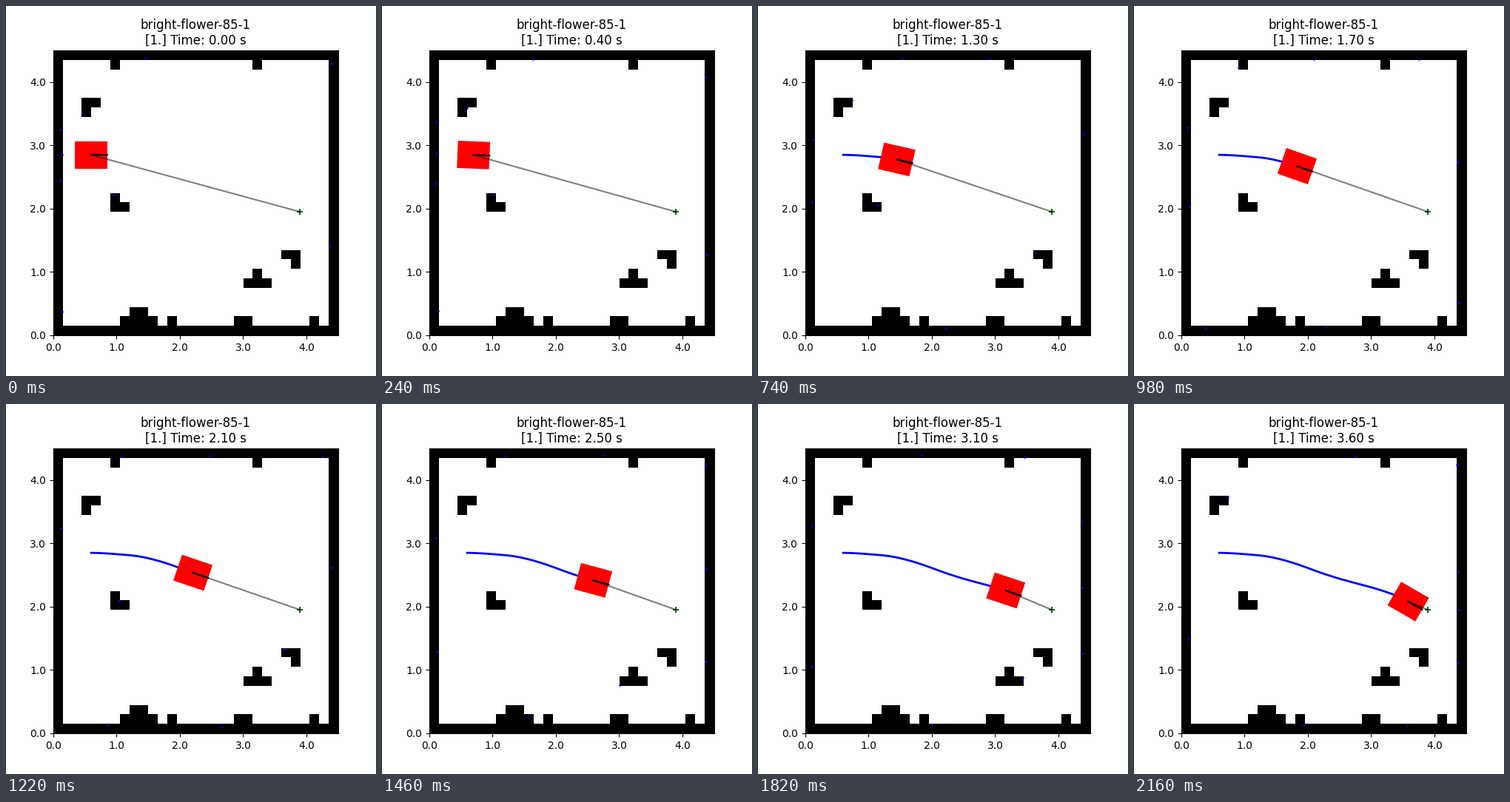
Recreate the animation shown at these times as a matplotlib script. Size 500x500 px, loop 2260 ms.

```python
import numpy as np
import matplotlib.pyplot as plt
from matplotlib.animation import FuncAnimation
from matplotlib.patches import Polygon

SIZE, CELL, N = 4.5, 0.15, 30
LENGTH, WIDTH = 0.508, 0.43
START, GOAL = (0.6, 2.85), (3.9, 1.95)
STEPS, DT = 37, 0.1
TICK_MS, TICKS = 20, 113

# Steering: heading in degrees at a few times
TURN_T = [0, 0.8, 1.0, 1.3, 1.7, 1.9, 2.5, 2.8, 3.1, 3.6]
TURN = [0, -4.6, -5, -13, -19.4, -20.5, -15.1, -14.8, -18.4, -30]

# Beam directions relative to the heading
SIDE = 180 - 39.8 * np.arange(1, 5)
BEAMS = np.radians(np.concatenate([[180], SIDE, -SIDE]))
RANGES = np.arange(0, 6.5, 0.005)


def make_grid():
    """Occupied cells, row 0 at the top."""
    grid = np.ones((N, N))
    grid[1:-1, 1:-1] = 0
    grid[1, [6, 21]] = 1                        # studs on the top wall
    grid[28, [12, 19, 20, 27]] = 1              # studs on the bottom wall
    grid[27, 8:10] = grid[28, 7:11] = 1         # stepped mound
    grid[23, 21] = grid[24, 20:23] = 1          # T piece
    for row, col, gap in [(5, 3, (1, 1)), (15, 6, (0, 1)), (21, 24, (1, 0))]:
        grid[row:row + 2, col:col + 2] = 1      # corner pieces
        grid[row + gap[0], col + gap[1]] = 0
    return grid


def drive():
    """Speed up, cruise, brake near the goal; Euler steps along the heading."""
    t = np.arange(STEPS) * DT
    heading = np.radians(np.interp(t, TURN_T, TURN))
    speed = np.minimum(np.minimum(t, 1), 4.35 - t)[1:, None]
    dirs = np.column_stack([np.cos(heading), np.sin(heading)])
    moves = speed * DT * dirs[:-1]
    return np.vstack([START, START + np.cumsum(moves, axis=0)]), heading


def scan(pos, heading, depth):
    """Points where the beams enter a wall, pushed in by a small depth."""
    ang = heading + BEAMS
    dirs = np.column_stack([np.cos(ang), np.sin(ang)])
    pts = pos + RANGES[None, :, None] * dirs[:, None, :]
    col = np.clip((pts[..., 0] / CELL).astype(int), 0, N - 1)
    row = np.clip(((SIZE - pts[..., 1]) / CELL).astype(int), 0, N - 1)
    hit = RANGES[np.argmax(grid[row, col] > 0, axis=1)]
    return pos + (hit + depth)[:, None] * dirs


def step_at(tick):
    """Odd steps stay five ticks, even steps one."""
    pair, rest = divmod(tick - 1, 6)
    return min(2 * pair + 1 + (rest == 5), STEPS - 1)


grid = make_grid()
track, headings = drive()
depths = np.random.default_rng(85).uniform(0.01, 0.05, (STEPS, len(BEAMS)))
scans = [scan(*args) for args in zip(track, headings, depths)]
corners = np.array([(1, 1), (-1, 1), (-1, -1), (1, -1)]) * (LENGTH / 2, WIDTH / 2)

fig, ax = plt.subplots(figsize=(5, 5), dpi=100)
ax.imshow(grid[::-1], cmap="gray_r", origin="lower", extent=(0, SIZE, 0, SIZE))
ax.set_xticks(range(5))
ax.set_yticks(range(5))
ax.xaxis.set_major_formatter("{x:.1f}")
ax.yaxis.set_major_formatter("{x:.1f}")
title = ax.set_title("")

trail, = ax.plot([], [], "b", lw=2, zorder=2)
hits = ax.scatter([], [], s=1, c="b", zorder=2)
body = ax.add_patch(Polygon(corners, fc="red", ec="none", zorder=3))
ax.scatter(*GOAL, marker="+", s=36, c="darkgreen", zorder=4)
aim, = ax.plot([], [], "k", alpha=0.5, zorder=4)
nose, = ax.plot([], [], "k", zorder=5)
ax.set_xlim(0, SIZE)
ax.set_ylim(0, SIZE)


def update(tick):
    k = step_at(tick)
    (x, y), ang = track[k], headings[k]
    c, s = np.cos(ang), np.sin(ang)
    body.set_xy(corners @ np.array([(c, s), (-s, c)]) + (x, y))
    trail.set_data(*track[:k + 1].T)
    aim.set_data([x, GOAL[0]], [y, GOAL[1]])
    nose.set_data([x, x + LENGTH / 2 * c], [y, y + LENGTH / 2 * s])
    hits.set_offsets(scans[k])
    title.set_text(f"bright-flower-85-1\n[1.] Time: {k * DT:.2f} s")
    return trail, body, aim, nose, hits, title


anim = FuncAnimation(fig, update, frames=TICKS, interval=TICK_MS,
                     repeat=True, repeat_delay=0)
plt.show()
```
